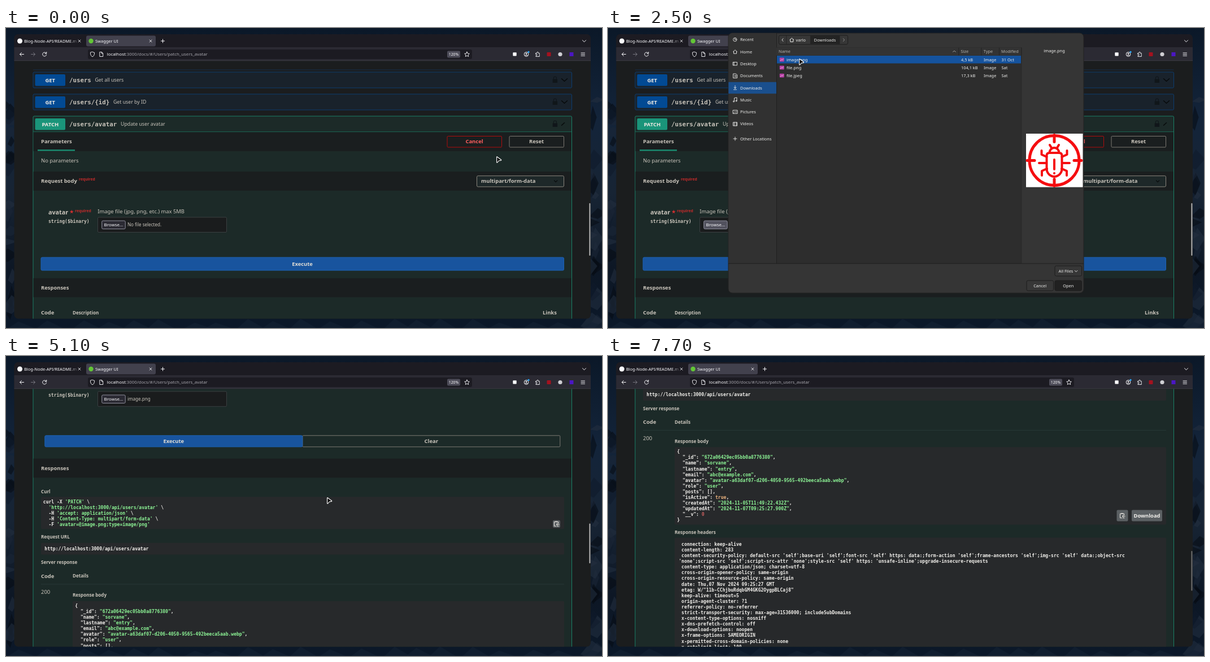
These frames come from a looping animation (1055 by 531 pixels, 7800 ms). An HTML page:

```html
<!DOCTYPE html>
<html lang="en">
<head>
<meta charset="utf-8">
<title>Avatar upload</title>
<style>
html, body { margin: 0; width: 100%; height: 100%; overflow: hidden; background: #0a1422; }
svg { display: block; width: 100%; height: 100%; }
text { white-space: pre; font-family: "Noto Sans", "Open Sans", sans-serif; }
.b { font-weight: 700; }
.m { font-family: "DejaVu Sans Mono", "Liberation Mono", monospace; font-weight: 700; }
</style>
</head>
<body>
<svg id="stage" viewBox="0 0 1055 531" xmlns="http://www.w3.org/2000/svg"></svg>
<script>
const LOOP = 7800, STEP = 100;
const INK = '#c9c4bb', LIGHT = '#fbfbfe', GREEN = '#8df596', TEAL = '#1b8f73';
const BLOCK = '#1c2a28', BAR = '#1a1e1f', PRE = '#27292b', BLUE = '#18549e';

// Markup helpers; text is placed by its vertical middle
const rect = (x, y, w, h, fill, extra = '') =>
  `<rect x="${x}" y="${y}" width="${w}" height="${h}" fill="${fill}" ${extra}/>`;
const box = (x, y, w, h, fill, stroke, r = 2, extra = '') =>
  rect(x, y, w, h, fill, `stroke="${stroke}" rx="${r}" ${extra}`);
const text = (x, y, s, size, fill = INK, cls = '', extra = '') =>
  `<text x="${x}" y="${(y + size * 0.36).toFixed(2)}" font-size="${size}" fill="${fill}" class="${cls}" ${extra}>${s}</text>`;
const bold = (x, y, s, size = 9.41, fill = INK, extra = '') => text(x, y, s, size, fill, 'b', extra);
const mid = 'text-anchor="middle"';
const line = (d, stroke = LIGHT, w = 1, extra = '') =>
  `<path d="${d}" fill="none" stroke="${stroke}" stroke-width="${w}" stroke-linecap="round" stroke-linejoin="round" ${extra}/>`;
const dot = (x, y, r, fill, extra = '') => `<circle cx="${x}" cy="${y}" r="${r}" fill="${fill}" ${extra}/>`;
const group = (id, body, extra = '') => `<g id="${id}" ${extra}>${body}</g>`;
const mono = (x, y, lines) => lines.map((s, i) => text(x, y + i * 10.1, s, 8.06, '#f2f0ec', 'm')).join('');
const tint = (s, fill) => `<tspan fill="${fill}">${s}</tspan>`;

function wallpaper() {
  let seed = 7;
  const rnd = () => (seed = (seed * 16807) % 2147483647) / 2147483647;
  let out = rect(0, 0, 1055, 531, 'url(#night)');
  for (let i = 0; i < 44; i++) {
    const side = i % 2, x = side ? 1032 + rnd() * 16 : rnd() * 12, y = 70 + rnd() * 440;
    const w = 6 + rnd() * 14, h = 8 + rnd() * 26;
    const fill = ['#060b13', '#1b2737', '#101b2b', '#243040'][Math.floor(rnd() * 4)];
    out += `<path d="M${x - w} ${y + h}L${x} ${y}L${x + w} ${y + h * 0.6}L${x} ${y + h * 1.3}z" fill="${fill}" opacity=".55"/>`;
  }
  for (let i = 0; i < 22; i++) {
    const x = i * 50 + rnd() * 20;
    out += `<path d="M${x} 531L${x + 18} ${514 + rnd() * 8}L${x + 46} 531z" fill="#152234" opacity=".6"/>`;
  }
  return out;
}

function browser() {
  let s = rect(14.5, 11, 1020.5, 503.5, '#1b1d1e', 'rx="7"');
  s += `<path d="M14.5 58V18a7 7 0 0 1 7-7H1028a7 7 0 0 1 7 7V58z" fill="#1c1b22"/>`;
  s += rect(14.5, 34, 1020.5, 24, '#2b2a33') + rect(14.5, 57.5, 1020.5, 0.7, '#45444c');
  s += rect(17, 13.5, 121, 19, '#35343f', 'id="tabHover" rx="3"');
  s += rect(142, 13.5, 123, 19, '#42414d', 'rx="3"');
  s += dot(24.5, 23, 4.5, LIGHT) + dot(150.5, 23, 4.2, '#62c636');
  s += text(32, 23.2, 'Blog-Node-API/README.m', 7.47, 'url(#tabFade)') + text(158, 23.2, 'Swagger UI', 7.47, LIGHT);
  for (const x of [130, 256]) s += line(`M${x - 2} 21l4 4m0-4l-4 4`, LIGHT, 0.8);
  s += line('M274.5 23h6m-3-3v6') + line('M1020.5 21.7l3 3l3-3');
  s += line('M31.5 46.5h-7m3-3l-3 3l3 3') + line('M44.5 46.5h7m-3-3l3 3l-3 3', '#77767f');
  s += line('M71 44.4a3.5 3.5 0 1 0 .6 3M71.7 42.6v2.7h-2.7');
  s += rect(145, 38, 680, 17, '#1c1b22', 'rx="3"');
  s += line('M153 42.4l3.6 1.2c0 4-1 6-3.6 7.3c-2.6-1.3-3.6-3.3-3.6-7.3z', LIGHT, 0.9);
  s += line('M166.2 42.6h3.3l2.2 2.2v5.7h-5.5zM169.3 42.8v2.3h2.2', LIGHT, 0.9);
  s += text(178.7, 46.5, tint('localhost', LIGHT) + ':3000/docs/#/Users/patch_users_avatar', 7.82, '#a5a4ab');
  s += rect(781, 40.5, 23, 12, '#4d4c58', 'rx="2"') + text(792.5, 46.6, '120%', 6.8, LIGHT, '', mid);
  s += line('M816 42.2l1.3 2.8l3 .4l-2.2 2.1l.6 3l-2.7-1.5l-2.7 1.5l.6-3l-2.2-2.1l3-.4z', LIGHT, 0.9);
  s += rect(897.3, 43.2, 6.4, 6.4, LIGHT, 'rx="1"');
  s += dot(921, 46.5, 3.8, 'none', `stroke="${LIGHT}"`) + dot(921, 45.5, 1.3, LIGHT);
  s += line('M918.8 49a2.6 2.6 0 0 1 4.4 0', LIGHT, 1) + dot(925, 42.5, 1.7, '#2aa4f4');
  s += line('M938 44.5h2v-1a1 1 0 0 1 2.2 0v1h2v6h-6.2v-1.8h1a1 1 0 0 0 0-2.2h-1z', LIGHT, 0.9);
  s += rect(957.5, 43, 7, 7, '#a3121f', 'rx="1"') + dot(981, 46.5, 3.6, '#cfcfd4') + rect(997.5, 43, 7, 7, '#4b16c4');
  s += line('M1018 44h6.5m-6.5 2.6h6.5m-6.5 2.6h6.5', LIGHT, 0.9);
  return s;
}

function summary(y, verb, path, desc, descX, color, open) {
  const lock = `<path d="M967.7 ${y + 12.5}h8.4v6.5h-8.4z" fill="#10161a"/>` +
    line(`M969.4 ${y + 12.5}v-2a2.5 2.5 0 0 1 5 0v2`, '#10161a', 1.2);
  const d = open ? -2.3 : 2.3;
  return rect(51.5, y + 4, 53.5, 20.5, color, 'rx="2"') + bold(78.3, y + 14.3, verb, 9.41, '#eeeae4', mid) +
    text(112, y + 13.8, path, 10.75, INK, 'm') + text(descX, y + 13.8, desc, 8.74) +
    lock + line(`M983.5 ${y + 14 - d}l5 ${2 * d}l5-${2 * d}`.replace('--', ''), '#06090a', 1.4);
}

const clipIcon = (x, y) => line(`M${x - 1} ${y + 4}h-3v-7.5h7v2.5M${x - 2} ${y - 4}h3M${x + 4.5} ${y + 1}h-4.5m1.6-1.7l-1.7 1.7l1.7 1.7M${x + 1} ${y + 4}h2.5`, '#eeeae4', 1);
const strip = (y, label) => rect(48.5, y, 952.5, 33.7, BAR) + bold(62, y + 16.7, label);

function page() {
  let s = rect(48, 73.6, 953.5, 0.8, '#173450');
  s += box(48, 78, 953.5, 28, '#19222b', '#0d3d6e') + summary(78, 'GET', '/users', 'Get all users', 157.5, '#024a94');
  s += box(48, 117, 953.5, 28, '#19222b', '#0d3d6e') + summary(117, 'GET', '/users/{id}', 'Get user by ID', 190, '#024a94');
  s += box(48, 156, 953.5, 1900, BLOCK, '#1a7f66') + summary(156, 'PATCH', '/users/avatar', 'Update user avatar', 203, '#1a957a', true);
  s += rect(48.5, 183.4, 952.5, 0.9, '#1a7f66');
  s += strip(184.3, 'Parameters') + rect(56, 215.2, 66, 2.4, TEAL);
  s += box(781, 191.5, 96.5, 19.5, 'none', '#b00d0d', 1.5) + bold(829, 201, 'Cancel', 9.41, '#ff5f5f', mid);
  s += box(891, 191.5, 96.5, 19.5, 'none', '#7d7a73', 1.5) + bold(939, 201, 'Reset', 9.41, INK, mid);
  s += text(62, 234.8, 'No parameters', 9.41);
  s += strip(254.2, 'Request body') + bold(129, 268, 'required', 6.72, '#c42b2b');
  s += box(833.5, 261.7, 154, 19.3, '#1e2829', '#8a867d') + bold(841, 271, 'multipart/form-data');
  s += line('M970.5 270l2.6 2.6l2.6-2.6', '#0a0d0e', 1.3);
  s += bold(75, 326, 'avatar', 10.75) + bold(112.5, 325, '★', 8, '#d43030') + bold(122, 323.6, 'required', 6.72, '#c42b2b');
  s += text(75, 341.8, 'string($binary)', 8.06, INK, 'm') + text(162.3, 325, 'Image file (jpg, png, etc.) max 5MB', 9.41);
  s += box(162.5, 335, 228, 26.5, '#1a1c1d', '#3a3f41', 1.5);
  s += box(169.7, 341.2, 41.5, 14.5, '#2b2a33', '#8f8f9d', 2, 'id="browse"') + text(190.4, 348.4, 'Browse...', 7.9, LIGHT, '', mid);
  s += text(215, 348.4, 'No file selected.', 8.06, INK, '', 'id="fileName"');
  s += group('clear', box(417, 413, 564, 20, 'none', '#7d7a73', 1.5) + bold(699, 423, 'Clear', 9.41, INK, mid));
  s += group('exec', box(62, 406, 925.5, 23, BLUE, '#1c61b4') + bold(524.5, 417.3, 'Execute', 9.41, '#e0ddd6', mid));
  s += group('idle', strip(442.8, 'Responses') + bold(62, 504, 'Code') + bold(118, 504, 'Description', 8.06) + bold(950, 504, 'Links'));
  return s + group('reply', reply());
}

function reply() {
  const curl = ["curl -X 'PATCH' \\", "  'http://localhost:3000/api/users/avatar' \\", "  -H 'accept: application/json' \\",
    "  -H 'Content-Type: multipart/form-data' \\", "  -F 'avatar=@image.png;type=image/png'"]
    .map(l => l.replace(/'[^']*'/g, q => tint(q, GREEN)));
  const body = ['{', '  "_id": "672a06429ec05bb0a8776380",', '  "name": "sorvane",', '  "lastname": "entry",',
    '  "email": "abc@example.com",', '  "avatar": "avatar-a63daf07-d206-4050-9565-492beeca5aab.webp",', '  "role": "user",',
    '  "posts": [],', '  "isActive": true,', '  "createdAt": "2024-11-05T11:49:22.432Z",',
    '  "updatedAt": "2024-11-07T09:25:27.900Z",', '  "__v": 0', '}']
    .map(l => l.replace(/: ("[^"]*"|true|0)/, (_, v) => ': ' + tint(v, v === 'true' ? '#e9b17d' : v === '0' ? '#c95f5f' : GREEN)));
  const headers = [' connection: keep-alive', ' content-length: 283',
    " content-security-policy: default-src 'self';base-uri 'self';font-src 'self' https: data:;form-action 'self';frame-ancestors 'self';img-src 'self' data:;object-src",
    "'none';script-src 'self';script-src-attr 'none';style-src 'self' https: 'unsafe-inline';upgrade-insecure-requests",
    ' content-type: application/json; charset=utf-8', ' cross-origin-opener-policy: same-origin',
    ' cross-origin-resource-policy: same-origin', ' date: Thu,07 Nov 2024 09:25:27 GMT',
    ' etag: W/"11b-CChjbuRdqbGM4GKG2OygpBLCaj8"', ' keep-alive: timeout=5', ' origin-agent-cluster: ?1',
    ' referrer-policy: no-referrer', ' strict-transport-security: max-age=31536000; includeSubDomains',
    ' x-content-type-options: nosniff', ' x-dns-prefetch-control: off', ' x-download-options: noopen',
    ' x-frame-options: SAMEORIGIN', ' x-permitted-cross-domain-policies: none', ' x-ratelimit-limit: 100'];
  let s = strip(453.8, 'Responses');
  s += bold(62, 512.5, 'Curl', 8.06) + rect(62, 521.5, 926, 57, PRE, 'rx="2"') + mono(65.8, 530.2, curl);
  s += rect(968, 563, 13, 13, '#5b6063', 'rx="2"') + clipIcon(974.5, 569.3);
  s += bold(62, 592.6, 'Request URL', 8.06) + rect(62, 603, 926, 20.8, PRE, 'rx="2"');
  s += mono(68.3, 613.2, ['http://localhost:3000/api/users/avatar']);
  s += bold(62, 637.7, 'Server response', 8.06) + bold(62, 661.8, 'Code') + bold(118, 661.8, 'Details', 8.06);
  s += rect(62, 675.8, 926, 0.7, '#2c3d3c') + text(62, 690, '200', 9.41) + bold(118, 695.8, 'Response body', 8.06);
  s += rect(118, 706, 870, 137.2, PRE, 'rx="2"') + mono(122.2, 714.2, body);
  s += rect(900.5, 817.2, 20, 20, '#5b6063', 'rx="2"') + clipIcon(910.5, 827.4);
  s += rect(927, 817.2, 54, 20, '#5b6063', 'rx="2"') + bold(954, 827.6, 'Download', 9.41, '#f2f0ec', mid);
  s += bold(118, 856.8, 'Response headers', 8.06) + rect(118, 866.3, 870, 260, PRE, 'rx="2"');
  return s + mono(125.2, 877.8, headers);
}

function bug() {
  const red = '#f50d10';
  let s = rect(740, 187, 100.5, 94.7, '#fff');
  s += dot(790, 234.5, 44, 'none', `stroke="${red}" stroke-width="5"`);
  s += line('M742 234.5h13m70 0h13M790 189.5v12m0 66v12', red, 5);
  s += line('M776.5 226q0-5 5-5h17q5 0 5 5v23a13.5 14 0 0 1-27 0zM781.5 221a8.5 9 0 0 1 17 0M790 233v17M790 257v.2', red, 4);
  s += line('M785 212l-3-5m13 5l3-5M776.5 228l-9-4v-7m36 11l9-4v-7M776 239h-13m41 0h13M777 249l-9 4v8m35-12l9 4v8', red, 4);
  return s;
}

function dialog() {
  const fs = 7.42, white = '#eeeeec', edge = '#1d1d1d';
  const button = (x, y, label, id = '') => box(x, y, 47.5, 18, '#373737', edge, 2.5, id) +
    text(x + 23.7, y + 9.1, label, fs, white, '', mid);
  let s = box(213, 9, 629, 460, '#353535', '#222', 7);
  s += `<path d="M213.5 417V16a7 7 0 0 1 7-7H298V417z" fill="#313131"/>` + rect(298, 34, 434, 383, '#2d2d2d');
  s += rect(298, 9, 0.8, 408, edge) + rect(213, 416.5, 629, 0.9, edge) + rect(298, 34.5, 434, 14, '#333');
  s += rect(213.3, 95.7, 84.7, 20.5, '#1a4f8d');
  const icons = ['M228 20.5a3.2 3.2 0 1 1-6.4 0a3.2 3.2 0 1 1 6.4 0M224.8 18.6v2h1.5', 'M221.5 42l3.5-3.2l3.5 3.2M222.5 41.5v3.8h5v-3.8',
    'M221.5 60.5h7v5.5h-7zM223 60.5v5.5', 'M222 81h4.5l2 2v5.5h-6.5zM224 84h3M224 86h3', 'M225 102v5m-2-2l2 2l2-2M222.5 109h5',
    'M223.5 130v-6l4.5-1v6M223.5 130a1 1 0 1 1-2 0a1 1 0 1 1 2 0M228 129a1 1 0 1 1-2 0a1 1 0 1 1 2 0',
    'M221.5 145.5h7.5v6h-7.5zM222.5 150l2-2l1.5 1.2l2-1.2', 'M221.8 167h6.8v6h-6.8zM223.5 167v6M227 167v6'];
  ['Recent', 'Home', 'Desktop', 'Documents', 'Downloads', 'Music', 'Pictures', 'Videos'].forEach((label, i) =>
    s += line(icons[i], white, 0.9) + text(234, 20.7 + i * 21.3, label, fs, white));
  s += line('M222 196h6m-3-3v6', white, 0.9) + text(234, 196, 'Other Locations', fs, white);
  s += box(302.5, 13, 122, 16, '#373737', edge, 2.5) + rect(358, 13.4, 52.5, 15.2, '#232323');
  s += rect(315.5, 13, 0.7, 16, edge) + line('M310 18.7l-2 2.4l2 2.4', white, 0.9) + line('M416.5 18.7l2 2.4l-2 2.4', '#999', 0.9);
  s += line('M321.8 21l3.5-3.2l3.5 3.2M322.8 20.5v4h5v-4', white, 1) + text(332.5, 21.2, 'varlo', fs, white) + text(384, 21.2, 'Downloads', fs, white, '', mid);
  [['Name', 302], ['Size', 624.5], ['Type', 664.7], ['Modified', 696]].forEach(([t, x]) => s += text(x, 41.4, t, fs, '#b4b4b0', 'h'));
  for (const x of [620.5, 660.5, 692, 731.5]) s += rect(x, 35, 0.7, 13.5, edge);
  s += line('M610.5 42.3l2.5-2l2.5 2', '#b4b4b0', 0.8) + rect(731.5, 34, 0.7, 383, '#262626');
  s += rect(299, 49, 432, 13.6, '#15539e');
  [['image.png', '4,5 kB', '31 Oct'], ['file.png', '104,1 kB', 'Sat'], ['file.jpeg', '17,3 kB', 'Sat']].forEach(([n, size, date], i) => {
    const y = 56 + i * 14.1;
    s += rect(303.8, y - 3.4, 8, 6.8, '#b83fa5', 'rx="1"') + line(`M305.3 ${y + 1.8}l2-2l1.3 1l1.7-2`, '#f6c8ee', 0.8);
    s += text(316, y + 0.2, n, fs, white) + text(625, y + 0.2, size, fs, white) + text(665, y + 0.2, 'Image', fs, white) + text(696.5, y + 0.2, date, fs, white);
  });
  s += text(790, 40.8, 'image.png', fs, white, '', mid) + bug();
  s += box(791, 421, 47.5, 18, '#373737', edge, 2.5) + text(797.5, 430.2, 'All Files', fs, white) + line('M826.3 429.3l2.3 2.3l2.3-2.3', white, 0.9);
  return s + button(741, 447, 'Cancel') + button(791, 447, 'Open', 'id="open"');
}

const stage = document.getElementById('stage');
stage.innerHTML = `<defs>
  <linearGradient id="night" x1="0" y1="0" x2="0" y2="1"><stop offset="0" stop-color="#0b1828"/><stop offset=".3" stop-color="#13243a"/>
  <stop offset=".55" stop-color="#172434"/><stop offset=".8" stop-color="#0d1725"/><stop offset="1" stop-color="#0b1829"/></linearGradient>
  <linearGradient id="tabFade" gradientUnits="userSpaceOnUse" x1="112" y1="0" x2="127" y2="0"><stop offset="0" stop-color="${LIGHT}"/><stop offset="1" stop-color="${LIGHT}" stop-opacity=".15"/></linearGradient>
  <clipPath id="view"><path d="M14.5 58.2H1035V507.5a7 7 0 0 1-7 7H21.5a7 7 0 0 1-7-7z"/></clipPath></defs>` +
  wallpaper() + browser() + `<g clip-path="url(#view)">${group('page', page())}</g>` +
  rect(1032.4, 310, 2, 93, '#b4b4b4', 'id="thumb" rx="1"') + group('dialog', dialog()) +
  group('cursor', '<path d="M-3-5.2L4.6.2Q5 1 4 1.4L.4 2L-2.3 5.2Q-3.4 5.6-3.4 4.4V-4.7Q-3.4-5.4-3-5.2z" fill="#111" stroke="#fff" stroke-width="1.1" stroke-linejoin="round"/>');

const $ = id => document.getElementById(id);
const set = (el, attrs) => { for (const k in attrs) el.setAttribute(k, attrs[k]); };
const show = (id, on) => set($(id), { visibility: on ? 'visible' : 'hidden' });

// Each row: time, then values; straight runs between rows
function track(rows, t) {
  const i = rows.findIndex(r => r[0] > t);
  if (i === 0) return rows[0].slice(1);
  if (i < 0) return rows[rows.length - 1].slice(1);
  const a = rows[i - 1], b = rows[i], k = (t - a[0]) / (b[0] - a[0]);
  return a.slice(1).map((v, j) => v + (b[j + 1] - v) * k);
}

const POINTER = [[0, 872, 233], [100, 850, 236], [300, 500, 300], [500, 205, 348], [600, 190, 350], [900, 190, 350],
  [1000, 231, 324], [1100, 236, 312], [1400, 313, 125], [1500, 325, 95], [1900, 342, 62], [2300, 342, 62], [2500, 342, 60],
  [2900, 342, 60], [3000, 521, 315], [3100, 521, 315], [3400, 592, 427], [3600, 592, 427], [3700, 591, 423], [4100, 591, 423],
  [4200, 560, 360], [4300, 560, 335], [4400, 560, 335], [4500, 561, 268], [4600, 561, 268], [4800, 570, 259], [4900, 570, 259],
  [5000, 572, 256], [6100, 572, 256], [6200, 574, 254], [7000, 574, 254], [7600, 75, 23]];
const SCROLL = [[4900, 0], [5000, 120], [5100, 272.2], [5200, 272.5], [5400, 272.5], [5500, 300], [5600, 370], [5700, 435],
  [5800, 454], [6500, 454], [6600, 461.3], [6700, 505], [6800, 535], [6900, 544.8]];
const GROW = [[4200, 0.617, 0.72], [4300, 0.9, 0.93], [4400, 0.9, 0.93], [4500, 1, 1]];

function executeButton(t) {
  const [bar, label] = $('exec').children, done = t >= 4200;
  if (!done) {
    set(bar, { x: 62, y: 406, width: 925.5, height: 23 });
    set(label, { x: 524.5, y: 420.7 });
    set($('exec'), { opacity: t < 4000 ? 1 : 0.5 });
    return;
  }
  const [grow, alpha] = track(GROW, t), w = 912 * grow / (1 + grow), edge = 68.8 + w;
  set(bar, { x: 68.8, y: 413, width: w, height: 20 });
  set(label, { x: 68.8 + w / 2, y: 426.4 });
  set($('exec'), { opacity: alpha });
  const [frame, clear] = $('clear').children;
  set(frame, { x: edge, width: 980.8 - edge });
  set(clear, { x: (edge + 980.8) / 2 });
}

function draw(time) {
  const t = Math.floor((time % LOOP) / STEP) * STEP;
  const picking = t >= 800 && t < 3000, loading = t >= 4000 && t < 4200, done = t >= 4200;
  const [x, y] = track(POINTER, t), [scroll] = track(SCROLL, t);
  set($('cursor'), { transform: `translate(${x} ${y})` });
  show('cursor', t < 7700);
  show('tabHover', t >= 7600 && t < 7700);
  show('dialog', picking);
  set($('open'), { fill: t >= 2400 ? '#212121' : '#373737' });
  set($('browse'), { fill: t >= 500 && t < 3000 ? '#52525e' : '#2b2a33' });
  $('fileName').textContent = t < 3000 ? 'No file selected.' : 'image.png';
  show('idle', t < 4000);
  show('reply', done);
  show('clear', done);
  executeButton(t);
  set($('page'), { transform: `translate(0 ${-scroll})` });
  set($('thumb'), {
    y: done ? 248 + scroll * 0.178 : loading ? 299 : 310,
    height: done ? 70.5 : loading ? 89 : 93,
    opacity: 1 - 0.45 * Math.min(1, Math.max(0, (t - 7000) / 700))
  });
}

const start = performance.now();
function tick() {
  draw(performance.now() - start);
  requestAnimationFrame(tick);
}
tick();
</script>
</body>
</html>
```
